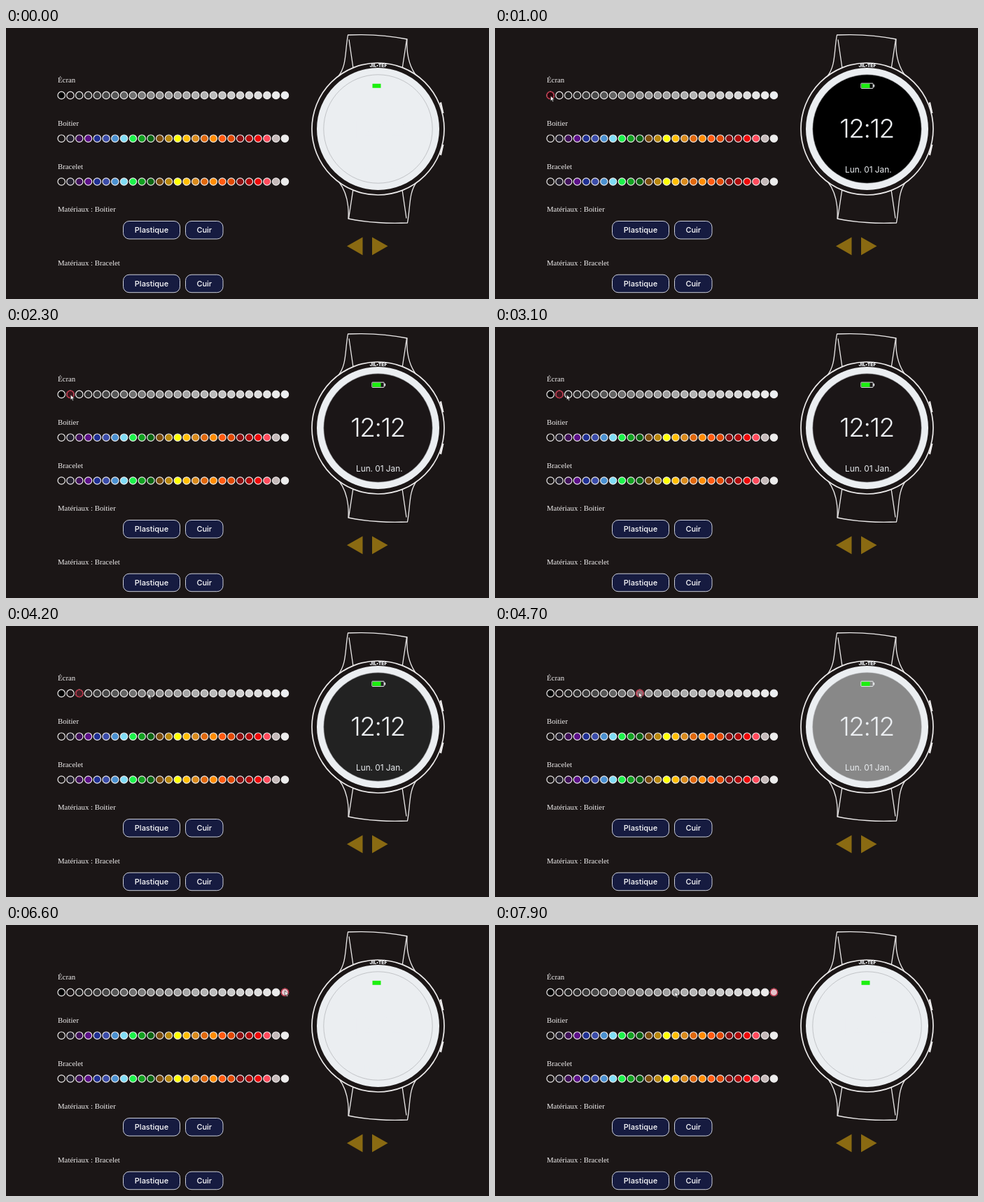
An HTML page for the animation above (8 s loop, 690x388 px).

```html
<!DOCTYPE html>
<html lang="fr">
<head>
<meta charset="utf-8">
<title>Configurateur de montre</title>
<style>
  html, body { margin: 0; width: 100%; height: 100%; overflow: hidden; background: #1b1616; }
  svg { display: block; width: 100vw; height: 100vh; }
  .label { font: 10.8px "Liberation Serif", serif; fill: #f0eeee; }
  .btn rect { fill: #161b40; stroke: #cdd0dc; }
  .btn text { font: 500 11px Inter, sans-serif; fill: #fff; text-anchor: middle; }
  .face { font-family: Inter, sans-serif; fill: #ebeef1; text-anchor: middle; }
  .line { fill: none; stroke: #eceaea; stroke-width: 1.3; stroke-linejoin: round; }
  .dot { stroke: #f0eeee; stroke-width: 1.2; }
</style>
</head>
<body>
<svg viewBox="0 0 690 388">
  <defs>
    <g id="strap" class="line">
      <path d="M474.500 69.500C487 54 484 34 488.500 10Q534 8 573 16C572 34 574 53 587 69.500"/>
      <path d="M490 16.500L496.500 61M572.500 16L565.500 62"/>
    </g>
  </defs>
  <g id="panel"></g>

  <use href="#strap"/>
  <use href="#strap" transform="rotate(180 531 144.500)"/>
  <circle class="line" cx="531.5" cy="144.5" r="94.5" style="fill:#1b1616;stroke-width:1.7"/>
  <path d="M619.500 107l2.500-1l3.500 16h-2zM623.500 167h2l-3.500 15.500l-2.500-1z" fill="#f0eeee"/>
  <text class="face" x="532" y="56.300" font-size="6.800" font-weight="900">JIL•TEF</text>
  <circle cx="531.5" cy="144.5" r="87.5" fill="#ebeef1"/>
  <circle id="screen" cx="531.5" cy="144.5" r="77.7" stroke="#a5a7a9" stroke-width=".6"/>
  <rect x="522.9" y="79.200" width="17.200" height="7.200" rx=".6" fill="none" stroke="#ebeef1"/>
  <path d="M540.500 81h1.600v3.600h-1.600z" fill="#ebeef1"/>
  <path d="M523.500 79.800h12v6h-12z" fill="#1cf00f"/>
  <text class="face" x="531" y="156.500" font-size="37" font-weight="300" letter-spacing="-1.5">12:12</text>
  <text class="face" x="533.300" y="207" font-size="11.800">Lun. 01 Jan.</text>
  <path d="M487 312.300L509.500 299.500V325.200zM545.500 312.300L523 299.500V325.200z" fill="#8a6a12"/>

  <path id="cursor" d="M0 0V7.200L1.700 5.700L2.800 8.400L4 7.900L2.900 5.300H5.200z"
        fill="#fff" stroke="#222" stroke-width=".6"/>
</svg>
<script>
const $ = id => document.getElementById(id);
const dotX = i => 79.2 + i * 12.77;

const gray = i => {
  if (i === 0) return '#000';
  if (i === 1) return '#1b1617';
  if (i === 25) return '#ebeef1';
  const v = Math.round(i < 10 ? 34 + (i - 2) * 12.75 : 136 + (i - 10) * 7);
  return `rgb(${v},${v},${v})`;
};
const grays = Array.from({ length: 26 }, (_, i) => gray(i));
const hues = ('1b1717 24212e 3f1059 5c0f88 1f2f92 3a4ba8 4a90d0 7fdcf5 1cf24a 12a020 0c6412 7a4c0c b8860b ' +
  'ffff00 ffbe00 d98a1c e0680c ff8c00 ff5a10 e04800 8b0f10 b00a0a ee0808 ff4a5c c4b8b8 ececec')
  .split(' ').map(c => '#' + c);

const label = (y, s) => `<text class="label" x="74" y="${y}">${s}</text>`;
const row = (y, colors) => colors.map((c, i) =>
  `<circle class="dot" cx="${dotX(i)}" cy="${y}" r="5.2" fill="${c}"/>`).join('');
const button = (x, y, w, s) => `<g class="btn"><rect x="${x}" y="${y}" width="${w}" height="25.5" rx="8.5"/>
  <text x="${x + w / 2}" y="${y + 16.5}">${s}</text></g>`;
const buttons = y => button(167.5, y, 81, 'Plastique') + button(256.5, y, 53.5, 'Cuir');

$('panel').innerHTML =
  label(78, 'Écran') + row(96.4, grays) +
  label(139.5, 'Boitier') + row(158.2, hues) +
  label(201.5, 'Bracelet') + row(220, hues) +
  label(263, 'Matériaux : Boitier') + buttons(276.5) +
  label(340, 'Matériaux : Bracelet') + buttons(353.2) +
  '<circle id="pick" cy="96.4" r="5.2" fill="#c81432" fill-opacity=".2" stroke="#b32238" stroke-width="1.3"/>';

// [time, selected screen dot]
const clicks = [[1000, 0], [2300, 1], [3400, 2], [4700, 10], [6500, 25]];
// [start, end, x, y]: the pointer reaches x, y at the end
const moves = [
  [900, 1000, 79.5, 97.2], [1400, 1700, 84, 97], [1800, 2100, 92.3, 97],
  [2400, 3100, 102.5, 97], [3400, 4200, 203, 96.5], [4200, 4500, 205.5, 95],
  [4800, 6200, 398.5, 94], [7200, 7900, 257, 95.5]
];
const ease = p => p * p * (3 - 2 * p);

function pointer(t) {
  let [, , x, y] = moves[0];
  for (const [a, b, nx, ny] of moves) {
    const p = ease(Math.min(1, Math.max(0, (t - a) / (b - a))));
    x += (nx - x) * p;
    y += (ny - y) * p;
  }
  return [x, y];
}

function draw(now) {
  const t = Math.floor(now % 8000 / 100) * 100;
  const last = clicks.filter(c => c[0] <= t).pop();
  const dot = last ? last[1] : 25;
  const shown = last ? 'visible' : 'hidden';
  $('screen').setAttribute('fill', grays[dot]);
  $('pick').setAttribute('cx', dotX(dot));
  $('pick').setAttribute('visibility', shown);
  $('cursor').setAttribute('visibility', shown);
  $('cursor').setAttribute('transform', `translate(${pointer(t)})`);
  requestAnimationFrame(draw);
}
draw(performance.now());
</script>
</body>
</html>
```
